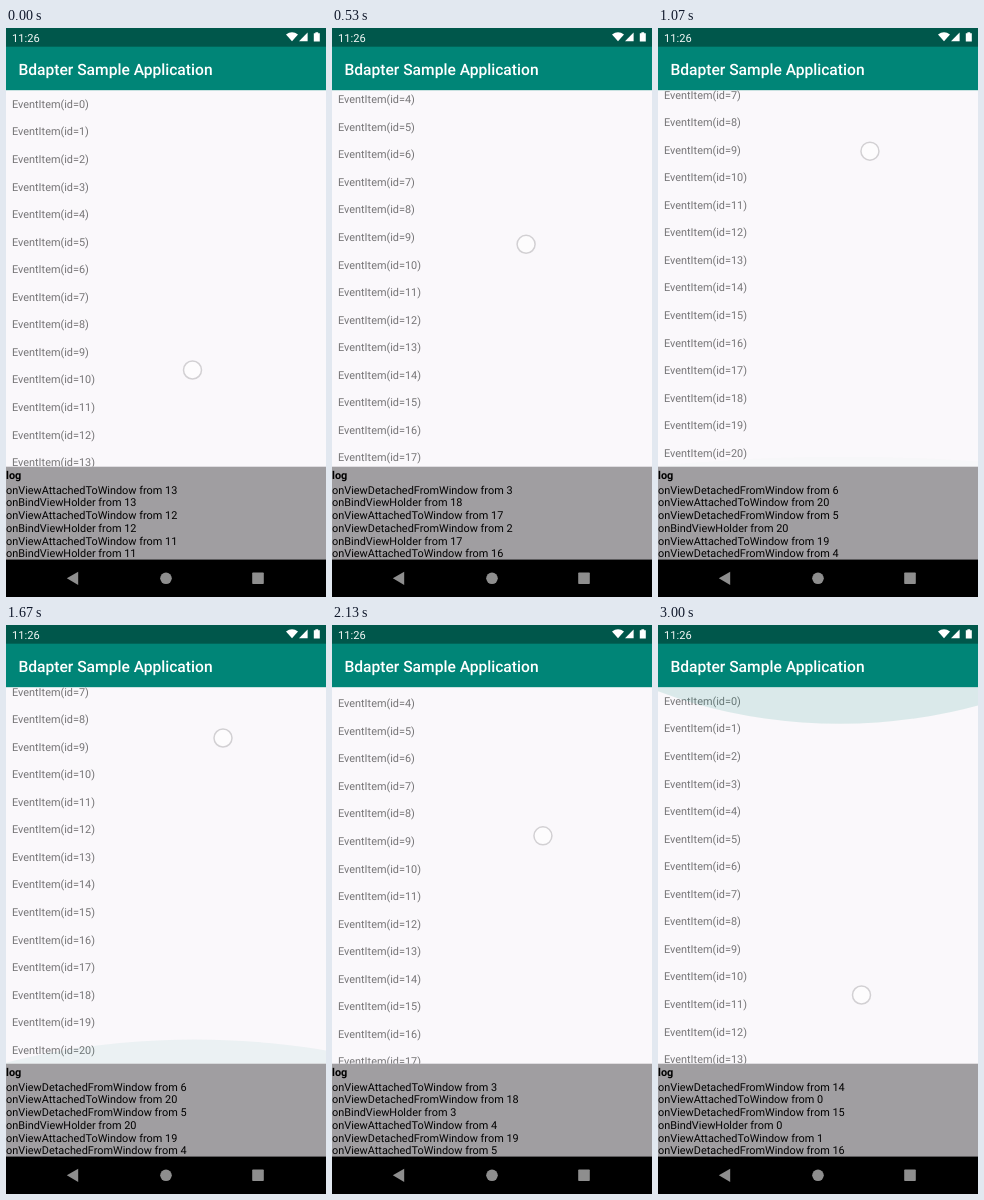
An HTML page for the animation above (3070 ms loop, 320x569 px).

```html
<!DOCTYPE html>
<html lang="en">
<head>
<meta charset="utf-8">
<title>Bdapter Sample Application</title>
<style>
  html, body { margin: 0; width: 100%; height: 100%; overflow: hidden; background: #000; }
  svg { display: block; width: 100%; height: 100%; }
  text {
    font: 10.9px Roboto, sans-serif;
    text-rendering: geometricPrecision;
    white-space: pre;
  }
  #rows text { fill: #757476; }
  #glow { fill: #008577; }
  #touch { fill: #fff; fill-opacity: .55; stroke: #d2d0d3; stroke-width: 1.5; }
  .clock { font-size: 11.1px; fill: #f4f8f7; }
  .title { font-size: 15.6px; font-weight: 500; fill: #fff; }
  .heading { font-weight: 700; }
</style>
</head>
<body>
<svg viewBox="0 0 320 569" preserveAspectRatio="none">
  <clipPath id="listArea"><rect y="62.2" width="320" height="376.5"/></clipPath>

  <rect width="320" height="569" fill="#faf8fb"/>
  <g clip-path="url(#listArea)">
    <g id="rows"></g>
    <circle id="glow" r="384"/>
  </g>

  <rect width="320" height="19" fill="#00574b"/>
  <rect y="18.7" width="320" height="43.5" fill="#008577"/>
  <text class="clock" x="6" y="13.7">11:26</text>
  <text class="title" x="12.4" y="46.6">Bdapter Sample Application</text>
  <g fill="#fff">
    <path d="M286 13.3L280 6.4Q286 2.2 292 6.4Z"/>
    <path d="M293 13.3H301.6V4.4Z"/>
    <path d="M307.8 5.2H309.4V4.2H312.2V5.2H313.8V13.5H307.8Z"/>
  </g>

  <rect y="438.7" width="320" height="93" fill="#a09ea1"/>
  <text class="heading" x="0" y="450.5">log</text>
  <g id="log"></g>

  <rect y="531.5" width="320" height="38" fill="#000"/>
  <g fill="#8e8e8e">
    <path d="M60.8 550.3L72.2 543.7V556.9Z"/>
    <circle cx="160" cy="550.3" r="5.8"/>
    <rect x="246.2" y="544.5" width="11.6" height="11.6" rx=".8"/>
  </g>

  <circle id="touch" r="9"/>
</svg>

<script>
  const LOOP = 3070, STEP = 200 / 3, TURN = 1670;
  const ROW = 27.556, VIEW = 376.5, TOP = 62.2, COUNT = 21, LINES = 6;
  const RADIUS = 384, GLOW_DEPTH = 51.4;
  const $ = id => document.getElementById(id);

  // time, touch x, touch y, scroll offset, edge glow (negative: bottom edge)
  const KEYS = [
    [0, 186.5, 342, 0, 0],
    [70, 186.5, 338, 0, 0],
    [130, 187, 327, 5, 0],
    [270, 188.5, 287, 45, 0],
    [530, 194, 217, 114.2, 0],
    [800, 205, 167.5, 161.4, 0],
    [1000, 210.5, 131, 197, 0],
    [1070, 212, 123, 202.2, -.2],
    [1500, 217, 113, 202.2, -.47],
    [1670, 217, 113, 202.2, -.47],
    [1800, 216, 130, 187, -.2],
    [2130, 211, 210, 108.7, 0],
    [2470, 203.5, 289, 33, 0],
    [2670, 203.3, 323, 0, 0],
    [3000, 203.5, 370, 0, .71]
  ];

  // Monotone cubic interpolation of one key column
  function sample(t, col) {
    const last = KEYS.length - 2;
    const slope = i => (KEYS[i + 1][col] - KEYS[i][col]) / (KEYS[i + 1][0] - KEYS[i][0]);
    const tangent = i => {
      if (i === 0) return slope(0);
      if (i > last) return slope(last);
      const a = slope(i - 1), b = slope(i);
      return a * b > 0 ? 2 * a * b / (a + b) : 0;
    };
    let i = 0;
    while (i < last && t >= KEYS[i + 1][0]) i++;
    const [a, b] = [KEYS[i], KEYS[i + 1]];
    const d = b[0] - a[0], u = Math.min(1, (t - a[0]) / d), v = 1 - u;
    return a[col] * v * v * (1 + 2 * u) + b[col] * u * u * (3 - 2 * u)
      + d * u * v * (tangent(i) * v - tangent(i + 1) * u);
  }

  const bind = (at, id) => ({ at, text: `onBindViewHolder from ${id}` });
  const attach = (at, id) => ({ at, text: `onViewAttachedToWindow from ${id}` });
  const detach = (at, id) => ({ at, text: `onViewDetachedFromWindow from ${id}` });

  const initial = [], down = [bind(3, 14)], up = [];
  for (let id = 11; id <= 13; id++) initial.push(bind(0, id), attach(0, id));
  for (let id = 14; id < COUNT; id++) {
    const at = ROW * id - VIEW;
    down.push(attach(at, id));
    if (id + 1 < COUNT) down.push(bind(at + 3, id + 1));
    up.push(detach(at, id));
  }
  for (let id = 0; id <= 6; id++) {
    const at = ROW * (id + 1);
    down.push(detach(at, id));
    up.push(attach(at, id));
    if (id >= 1 && id <= 4) up.push(bind(at - 3, id - 1));
  }
  down.sort((a, b) => a.at - b.at);
  up.sort((a, b) => b.at - a.at);

  function logLines(t, scroll) {
    const events = t < TURN
      ? [...initial, ...down.filter(e => e.at < scroll)]
      : [...down, ...up.filter(e => e.at > scroll)];
    return events.slice(-LINES).reverse();
  }

  function addText(parent, x, y, content) {
    const el = document.createElementNS("http://www.w3.org/2000/svg", "text");
    el.setAttribute("x", x);
    el.setAttribute("y", y);
    el.textContent = content;
    parent.append(el);
    return el;
  }

  for (let id = 0; id < COUNT; id++) {
    addText($("rows"), 6, TOP + 17.7 + ROW * id, `EventItem(id=${id})`);
  }
  const lines = Array.from({ length: LINES }, (_, i) => addText($("log"), 0, 465.6 + 12.74 * i, ""));

  function drawGlow(x, amount) {
    const bottom = amount < 0;
    const cx = 160 + (x - 160) / 2;
    const scale = bottom ? amount : Math.max(amount, .0001);
    $("glow").setAttribute("transform",
      `translate(${cx} ${bottom ? TOP + VIEW : TOP}) scale(1 ${scale}) translate(0 ${GLOW_DEPTH - RADIUS})`);
    $("glow").setAttribute("opacity", .26 * amount * amount);
  }

  function draw(now) {
    const t = Math.floor((now % LOOP + 4) / STEP) * STEP;
    const [x, y, scroll, glow] = [1, 2, 3, 4].map(col => sample(t, col));
    $("touch").setAttribute("transform", `translate(${x} ${y})`);
    $("rows").setAttribute("transform", `translate(0 ${-scroll})`);
    drawGlow(x, glow);
    logLines(t, scroll).forEach((e, i) => { lines[i].textContent = e.text; });
  }

  const start = performance.now();
  function tick() {
    draw(performance.now() - start);
    requestAnimationFrame(tick);
  }
  tick();
</script>
</body>
</html>
```
